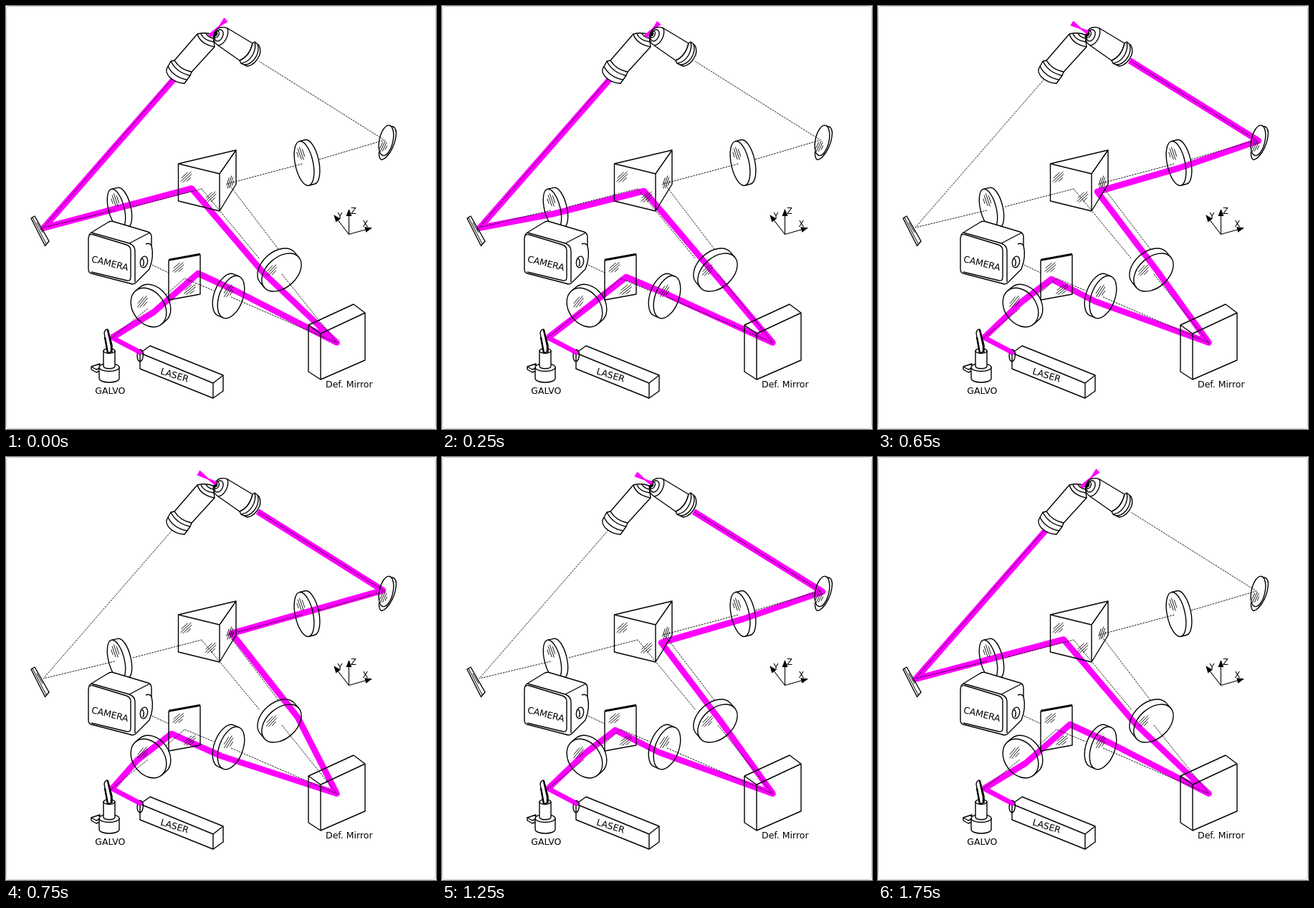
An HTML page with a canvas that plays this animation: 600 px wide and 590 px high, repeating every 2000 ms.

```html
<!DOCTYPE html>
<html lang="en">
<head>
<meta charset="utf-8">
<title>Scanning microscope light path</title>
<style>
  html, body { margin: 0; width: 100%; height: 100%; overflow: hidden; background: #fff; }
  canvas, svg { position: absolute; left: 0; top: 0; width: 600px; height: 590px; }
  text { font: 12.5px "DejaVu Sans", sans-serif; fill: #000; }
  .mid { text-anchor: middle; }
  .axis { font-size: 11.5px; }
</style>
</head>
<body>
<canvas id="stage" width="600" height="590"></canvas>
<svg viewBox="0 0 600 590">
  <text x="124.3" y="540.5">GALVO</text>
  <text x="446" y="532">Def. Mirror</text>
  <text class="mid" transform="translate(144 363) rotate(14)">CAMERA</text>
  <text class="mid" transform="translate(234 519) rotate(17)">LASER</text>
  <text class="axis" x="497.5" y="308">X</text>
  <text class="axis" x="462.5" y="296.5">Y</text>
  <text class="axis" x="481" y="289.5">Z</text>
</svg>
<script>
const ctx = document.getElementById('stage').getContext('2d');
const BEAM = '#f0f';
const STEP = 250;
const ORDER = [0, 1, 2, 3, 3, 2, 1, 0];

const LASER = [190, 484.5], GALVO = [148, 462.5], MIRROR = [461.5, 469.5];
const LEFT = [[52.5, 309.5], [236, 100]];
const RIGHT_END = [351, 76];

// Path between galvo and deformable mirror, then on to one objective.
const SCANS = [
  { scan: [[206, 427], [268, 373], [322, 398]], relay: [[359, 372], [259, 254.5], ...LEFT],
    spot: [[284, 42], [298, 28], [307, 19]] },
  { scan: [[206, 418], [257, 378], [309, 400]], relay: [[373, 365], [282, 258], [155, 290], ...LEFT],
    spot: [[284, 43], [295, 31], [303, 23.5]] },
  { scan: [[200, 413], [242, 381], [303, 412]], relay: [[390, 370], [306, 259], [420, 226], [531, 188], RIGHT_END],
    spot: [[296, 39], [283, 31.5], [270.5, 24]] },
  { scan: [[183, 423], [231, 386], [300, 417]], relay: [[407, 363], [315, 246], [526, 186], RIGHT_END],
    spot: [[296, 39], [282, 30.5], [268.5, 22]] }
];

const DASHES = [
  [[232, 102], [52, 309], [152, 285]],
  [[177, 280], [273, 255], [354, 353]],
  [[385, 374], [462, 470]],
  [[309, 248], [414, 220]],
  [[437, 214], [528, 187], [353, 77]],
  [[312, 250], [380, 339]],
  [[147, 463], [198, 422]],
  [[223, 403], [249, 380], [290, 397]],
  [[314, 406], [462, 470]],
  [[197, 358], [227, 372]]
];

function line(points) {
  ctx.beginPath();
  points.forEach(p => ctx.lineTo(p[0], p[1]));
  ctx.stroke();
}

function shape(d, fill) {
  const path = new Path2D(d);
  if (fill) {
    ctx.fillStyle = fill;
    ctx.fill(path);
  }
  ctx.stroke(path);
}

function ellipse(x, y, rx, ry, deg, fill) {
  ctx.beginPath();
  ctx.ellipse(x, y, rx, ry, deg * Math.PI / 180, 0, 2 * Math.PI);
  if (fill) {
    ctx.fillStyle = fill;
    ctx.fill();
  }
  ctx.stroke();
}

// Disc seen at an angle, with its rim extruded by (dx, dy).
function lens(x, y, rx, ry, deg, dx, dy) {
  const a = deg * Math.PI / 180, c = Math.cos(a), s = Math.sin(a);
  const u = dx * c + dy * s, v = dy * c - dx * s;
  const t = Math.atan2(-ry * u, rx * v);
  const px = rx * Math.cos(t), py = ry * Math.sin(t);
  const ex = px * c - py * s, ey = px * s + py * c;
  ellipse(x, y, rx, ry, deg);
  ctx.beginPath();
  ctx.moveTo(x + ex, y + ey);
  ctx.ellipse(x + dx, y + dy, rx, ry, a, t, t + Math.PI);
  ctx.lineTo(x - ex, y - ey);
  ctx.stroke();
}

// Four glint strokes around (x, y), each along (dx, dy).
function glint(x, y, dx, dy, gap = 2.8) {
  const n = Math.hypot(dx, dy), gx = -dy / n * gap, gy = dx / n * gap;
  ctx.lineWidth = 0.9;
  [0.6, 1, 0.85, 0.4].forEach((k, i) => {
    const cx = x + gx * (i - 1.5), cy = y + gy * (i - 1.5);
    line([[cx - dx * k / 2, cy - dy * k / 2], [cx + dx * k / 2, cy + dy * k / 2]]);
  });
  ctx.lineWidth = 1.4;
}

function arrow(x1, y1, x2, y2) {
  line([[x1, y1], [x2, y2]]);
  ctx.save();
  ctx.translate(x2, y2);
  ctx.rotate(Math.atan2(y2 - y1, x2 - x1));
  ctx.fillStyle = '#000';
  ctx.beginPath();
  ctx.moveTo(1, 0);
  ctx.lineTo(-9, -4);
  ctx.lineTo(-9, 4);
  ctx.fill();
  ctx.restore();
}

function drawBeam({ scan, relay }) {
  ctx.strokeStyle = BEAM;
  ctx.lineJoin = 'round';
  ctx.lineWidth = 8.6;
  line([GALVO, ...scan, MIRROR, ...relay]);
  ctx.lineWidth = 7;
  line([LASER, GALVO, scan[0]]);
}

function drawSpot([from, waist, to]) {
  const dx = to[0] - from[0], dy = to[1] - from[1], n = Math.hypot(dx, dy);
  const nx = -dy / n, ny = dx / n;
  const ring = [[from, 3], [waist, 0.9], [to, 3.8]];
  ctx.fillStyle = BEAM;
  ctx.beginPath();
  ring.forEach(([p, w]) => ctx.lineTo(p[0] + nx * w, p[1] + ny * w));
  ring.reverse().forEach(([p, w]) => ctx.lineTo(p[0] - nx * w, p[1] - ny * w));
  ctx.fill();
}

function drawDashes() {
  ctx.strokeStyle = '#000';
  ctx.lineWidth = 0.9;
  ctx.setLineDash([2.6, 1.3]);
  DASHES.forEach(d => line(d));
  ctx.setLineDash([]);
}

function drawObjectives(spot) {
  // left: barrel, then the wider flange
  shape('M235 76 L267 39 Q278 36 289 40 L291 57 L259 92 Q243 89 235 76 Z', '#fff');
  shape('M267 39 Q271 53 291 57 M272 39 Q276 48 290 50 M279 38 Q281 43 289 45');
  shape('M235 76 L230 77 L224 88 Q223 93 228 99 Q236 107 249 108 L257 97 L259 92 Q243 89 235 76 Z', '#fff');
  shape('M230 77 Q238 93 257 97 M226 84 Q233 99 253 103');
  drawSpot(spot);
  // right
  shape('M299 30 Q304 29 309 31 L344 52 Q340 70 326 76 L296 55 Q288 50 290 41 Q292 32 299 30 Z', '#fff');
  shape('M309 31 C312 40 305 54 296 55');
  shape('M344 52 L347 50 L353 55 Q356 61 354 68 Q348 82 337 84 L328 80 L326 76 Q340 70 344 52 Z', '#fff');
  shape('M347 50 C350 62 342 78 328 80 M351 53 C355 65 346 81 333 82');
  ellipse(297, 41, 5.5, 8.5, 25);
  ellipse(294, 39.5, 3, 4.8, 25);
  ellipse(293, 39, 1.5, 2.5, 25, '#000');
  if (spot[2][0] < 290) drawSpot([[293, 37], spot[1], spot[2]]);
}

function drawOptics() {
  // flat folding mirror
  shape('M35 296 L40 293 L60 328 L54.500 334.500 Z');
  ctx.lineWidth = 1;
  shape('M37 295 L56.500 332.500 M43 302 L51 316');
  ctx.lineWidth = 1.4;

  lens(154, 283, 11, 28.5, -14, 9, -2);
  glint(152, 271, 6, 18);
  lens(416, 219.5, 12.5, 31.5, -12, 8, -2);
  glint(411, 206, 6, 18);
  lens(384.5, 371.5, 32, 21, -42, -6, -7);
  glint(371, 369, 14, -15);
  lens(314, 406, 16.5, 31, 20, -7, -3);
  glint(311, 398, 11, -17);
  lens(199, 420.5, 22, 29.5, -36, 6, -5);
  glint(191, 413, 13, -16);

  ellipse(530.5, 187.5, 9.5, 21.5, 12);
  shape('M538 168 Q544 168 544.500 177 Q544 191 536 204 Q529 214 524 214.500 Q520 213 520.500 203');
  glint(527, 196, 7, -15, 2.5);

  // prism
  shape('M240.500 220 L298 234 V286 L240.500 272 Z M240.500 220 L321 201 L298 234 M321 201 V248.500 L298 286');
  glint(252, 239, 15, -14);
  glint(286, 267, 15, -14);
  glint(313, 246, 6, -18, 2.4);

  // plate
  shape('M227 355 L271 347 V402 L227 410 Z M227 353.500 L271 345.500');
  glint(241, 365, 15, -13);
  glint(257, 396, 16, -13);

  // deformable mirror
  shape('M439 457 L501 428 V494 L439 521 Z M439 457 L422 445 L485 416 L501 428 M422 445 V510 L439 521');
}

function drawCamera() {
  shape('M115 325 Q115 319 119 316 L142 302 Q146 299 151 301 L198 315 Q203 317 203 322 V334 Q207 350 200 367 L181 386 Q178 389 173 387 L119 373 Q115 372 115 367 Z', '#fff');
  // front panel, top edge, side edge
  shape('M116 320 Q118 318 122 319 L168 333 Q174 335 174 341 V378 Q174 384 169 383 L119 371');
  shape('M119 316 L172 331 L201 316 M172 331 Q180 334 180 342 V385');
  shape('M203 334 Q200 330 195 332');
  ellipse(192.5, 357, 5, 8, 12, '#fff');
  shape('M190 352 Q194 356 191 363');
}

function drawLaser() {
  shape('M187 484 L201 474 L303 515 V537 L289 547 L187 506 Z', '#fff');
  shape('M187 484 L289 526 L303 515 M289 526 V547');
  shape('M188 479 Q184 480 183 487 Q183 495 187 496');
  ctx.lineWidth = 5;
  ctx.strokeStyle = BEAM;
  line([[184, 481.5], LASER]);
  ctx.strokeStyle = '#000';
  ctx.lineWidth = 1.4;
  shape('M188 479 Q193 482 191 490 Q190 495 187 496');
}

function drawGalvo() {
  shape('M131 499 L119 503 V507 L126 511 L131 509 Z M119 503 L126 507 L131 505', '#fff');
  shape('M130 504 V519 C130 527 158 527 158 519 V504 Z', '#fff');
  ellipse(144, 504, 14, 5.5, 0, '#fff');
  shape('M136 481 V502 C136 507 152 507 152 502 V481 Z', '#fff');
  ellipse(144, 481, 8, 3.5, 0, '#fff');
  shape('M137 456 Q138 451 142 451 L148 473 L148 482 L142 484 Z', '#fff');
  ctx.lineWidth = 2.4;
  shape('M142 452 L147 474 L147 482 M138 462 L142 484');
  ctx.lineWidth = 1.4;
}

function drawAxes() {
  ctx.lineWidth = 1.1;
  arrow(478.5, 318.5, 478.5, 284);
  arrow(478.5, 318.5, 510, 309.5);
  arrow(478.5, 318.5, 458, 292);
}

function draw(state) {
  ctx.fillStyle = '#fff';
  ctx.fillRect(0, 0, 600, 590);
  ctx.strokeStyle = '#ccc';
  ctx.lineWidth = 1;
  ctx.beginPath();
  ctx.roundRect(0.5, 0.5, 599, 589, 5);
  ctx.stroke();

  drawBeam(state);
  drawDashes();
  ctx.lineWidth = 1.4;
  drawOptics();
  drawCamera();
  drawLaser();
  drawGalvo();
  drawObjectives(state.spot);
  drawAxes();
}

const start = performance.now();
let shown = -1;

function tick() {
  const step = Math.floor((performance.now() - start) / STEP) % ORDER.length;
  if (ORDER[step] !== shown) {
    shown = ORDER[step];
    draw(SCANS[shown]);
  }
  requestAnimationFrame(tick);
}
tick();
</script>
</body>
</html>
```
